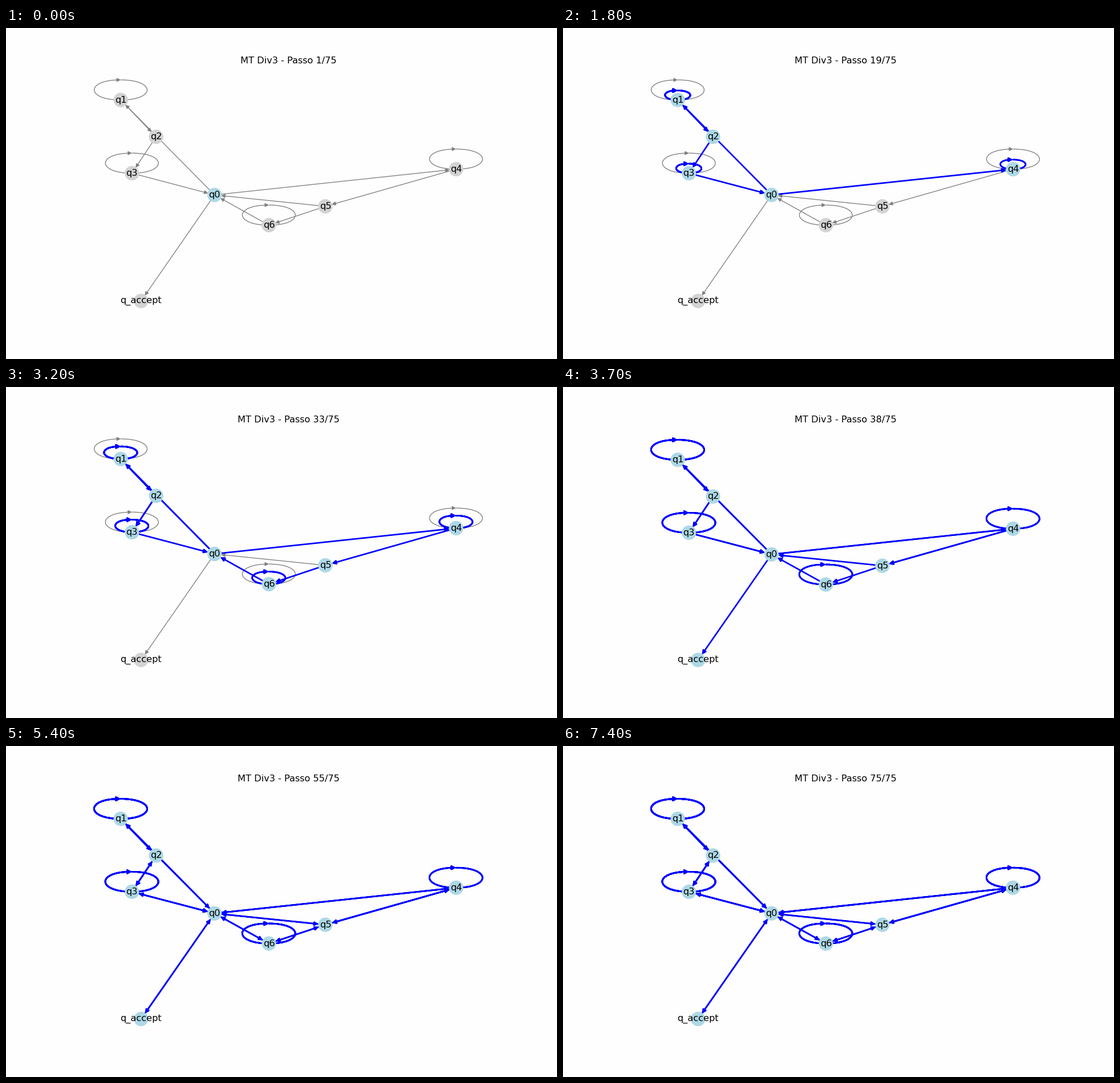
These frames come from a looping animation (966x580 px, 7500 ms). A matplotlib script:

```python
import matplotlib.pyplot as plt
from matplotlib.animation import FuncAnimation
from matplotlib.patches import FancyArrowPatch
from matplotlib.path import Path

W, H = 966, 580
K = 0.966               # scale applied to all point sizes
NODE_SIZE = 300
LOOP_DX = 61.8          # loop control offset for a full-height loop
FLOOR = 495.9           # y that stays fixed when the layout rescales
SQUEEZE = 0.996

NODES = {
    "q0": (365.6, 292.5),
    "q1": (201.15, 126.15),
    "q2": (263.1, 190.65),
    "q3": (220.8, 254.45),
    "q4": (789.05, 247.35),
    "q5": (559.9, 312.5),
    "q6": (460.9, 345.5),
    "q_accept": (236.8, 478.3),
}

# States of the forward run with the number of steps spent in each
RUNS = [
    ("q0", 1), ("q1", 7), ("q2", 1), ("q3", 6),
    ("q0", 1), ("q4", 5), ("q5", 1), ("q6", 4),
    ("q0", 1), ("q1", 3), ("q2", 1), ("q3", 2),
    ("q0", 1), ("q4", 1), ("q5", 1), ("q0", 1), ("q_accept", 1),
]
forward = [state for state, n in RUNS for _ in range(n)]
trail = forward + forward[-2::-1]       # compute, then undo every step
rules = list(dict.fromkeys(zip(forward, forward[1:])))
STEPS = len(trail)

plt.rcParams["font.family"] = "DejaVu Sans"
fig = plt.figure(figsize=(W / 100, H / 100), dpi=100, facecolor="#fefefe")
ax = fig.add_axes([0, 0, 1, 1])
ax.set_xlim(0, W)
ax.set_ylim(H, 0)
ax.axis("off")

title = ax.text(495.1, 62.3, "", fontsize=12 * K, ha="center", va="baseline")
dots = ax.scatter(*zip(*NODES.values()), s=NODE_SIZE * K**2,
                  linewidths=1.5 * K, edgecolors="face", zorder=2)
labels = {
    name: ax.text(x, y, name, fontsize=12 * K, ha="center", va="center",
                  zorder=4)
    for name, (x, y) in NODES.items()
}
arrows = []


def layout(squeezed):
    s = SQUEEZE if squeezed else 1
    return {n: (x, FLOOR - (FLOOR - y) * s) for n, (x, y) in NODES.items()}


def span(pos, names):
    ys = [pos[n][1] for n in names]
    return max(ys) - min(ys)


def loop_path(x, y, up, dx):
    points = [(x, y - up), (x + dx, y - up), (x + dx, y), (x, y),
              (x - dx, y), (x - dx, y - up), (x, y - up)]
    return Path(points, [Path.MOVETO] + [Path.CURVE4] * 6)


def draw_edges(edges, pos, color, width):
    if not edges:
        return
    height = span(pos, {n for edge in edges for n in edge})
    dx = LOOP_DX * height / span(pos, pos)
    style = dict(arrowstyle="-|>", mutation_scale=10 * K, color=color,
                 linewidth=width * K, zorder=1)
    shrink = NODE_SIZE**0.5 / 2 * K
    for a, b in edges:
        if a == b:
            arrow = FancyArrowPatch(
                path=loop_path(*pos[a], 0.1 * height, dx), **style)
        else:
            arrow = FancyArrowPatch(pos[a], pos[b], shrinkA=shrink,
                                    shrinkB=shrink, **style)
        arrows.append(ax.add_artist(arrow))


def update(i):
    while arrows:
        arrows.pop().remove()
    seen = trail[:i + 1]
    pos = layout("q_accept" in seen)
    draw_edges(rules, pos, "gray", 1)
    draw_edges(list(zip(seen, seen[1:])), pos, "blue", 2)
    dots.set_offsets(list(pos.values()))
    dots.set_facecolor(["lightblue" if n in seen else "lightgray"
                        for n in pos])
    for name, label in labels.items():
        label.set_position(pos[name])
    title.set_text(f"MT Div3 - Passo {i + 1}/{STEPS}")
    return [title, dots, *labels.values(), *arrows]


anim = FuncAnimation(fig, update, frames=STEPS, interval=100,
                     init_func=lambda: [], repeat=True, repeat_delay=0)
plt.show()
```
